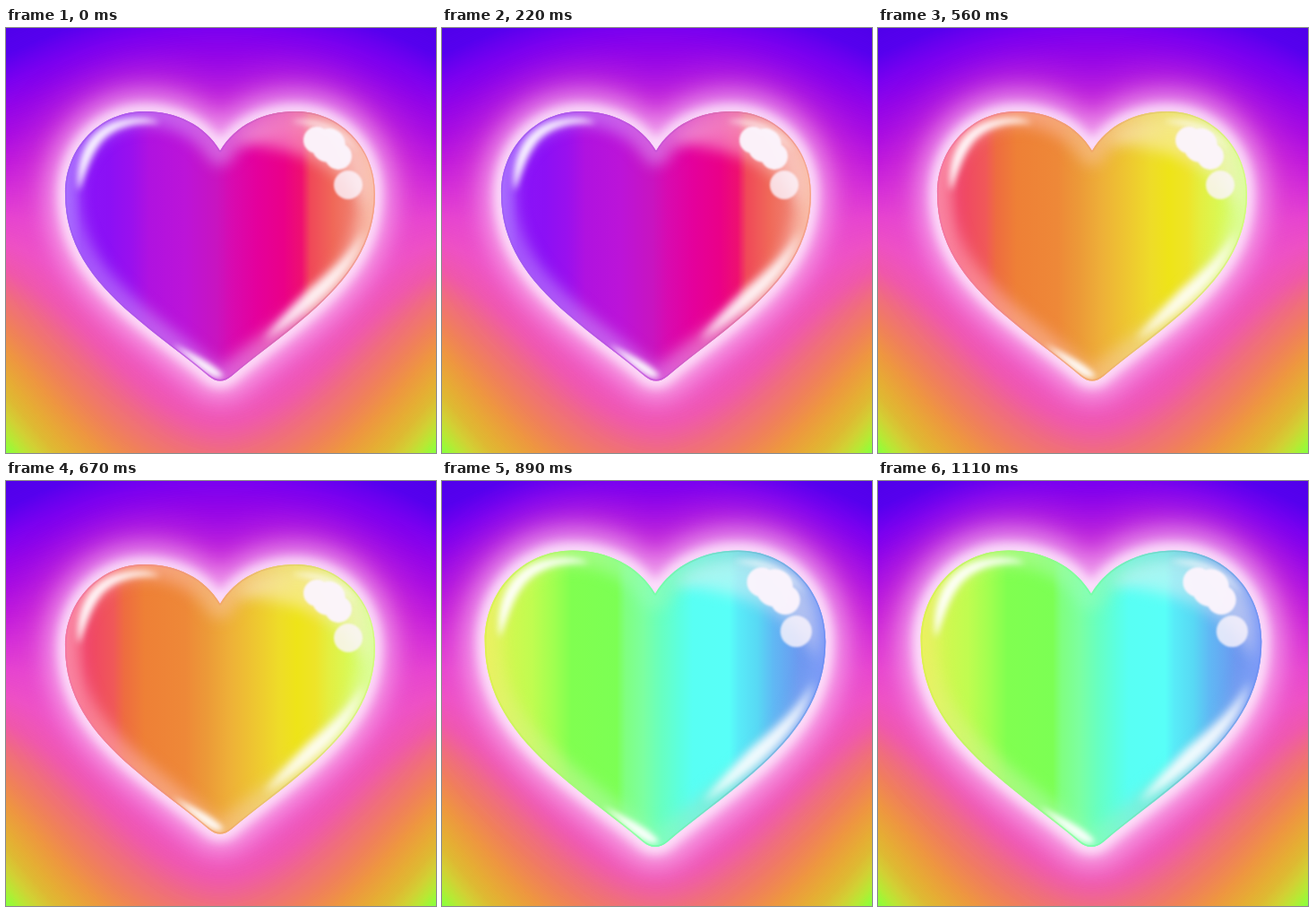
Recreate the animation shown at these times as an HTML page with a canvas. Size 480 by 474 pixels, loop 1.22 s.

```html
<!DOCTYPE html>
<html lang="en">
<head>
<meta charset="utf-8">
<title>Glossy heart</title>
<style>
html, body { margin: 0; width: 100%; height: 100%; overflow: hidden; background: #e84ccc; }
canvas { display: block; width: 480px; height: 474px; }
</style>
</head>
<body>
<canvas id="stage" width="480" height="474"></canvas>
<script>
const W = 480, H = 474, LOOP = 1220;
const ctx = document.getElementById('stage').getContext('2d');

const heart = new Path2D(
  'M239 137 C222 108 190 93 155 93 C105 93 66 133 66 185 C66 240 95 280 140 319 ' +
  'C170 345 200 366 226 388 Q239 399 252 388 C278 366 308 345 338 319 ' +
  'C383 280 412 240 412 185 C412 133 373 93 323 93 C288 93 256 108 239 137Z');
const leftGloss = new Path2D(
  'M81 182 C76 142 94 108 132 102 C150 99 164 101 172 106 C140 104 117 112 104 130 C93 145 89 162 81 182Z');
const rightGloss = new Path2D(
  'M400 225 C393 260 366 292 334 317 C320 328 305 338 288 348 C304 327 322 308 338 292 C364 270 386 252 400 225Z');
const topGloss = new Path2D('M318 104 C345 98 376 108 394 140 C378 120 350 110 318 104Z');
const lobeSheen = new Path2D(
  'M258 128 C280 100 340 94 376 114 C402 134 408 170 402 205 C388 166 345 135 258 128Z');
const tipGloss = new Path2D('M186 352 C204 362 230 372 243 388 C234 394 222 386 186 352Z');

const sky = [
  '0 #5000ea', '30 #5600ee', '60 #7a00f0', '90 #9405e8', '120 #aa0ce2', '150 #c018dc',
  '180 #d42cd8', '210 #e642d0', '240 #ee50c4', '270 #f058aa', '300 #f06e7c', '330 #f0805a',
  '360 #ee9640', '390 #e6ac34', '410 #deba32', '430 #d2d034', '450 #b8e834', '465 #98fa38', '474 #88ff40'];

const looks = [
  { start: 0, zoom: 1, rim: ['#b080ff', '#dc8cf0', '#ffd0b4'], edge: ['#9a5cf0', '#c050d8', '#f49878'], fill: [
    '66 #9a50ff', '85 #8a14f8', '115 #8c10f5', '140 #9a10ee', '160 #b012e0', '200 #bc14d8',
    '235 #c814c0', '252 #d80ab0', '280 #e4009c', '310 #ea0088', '330 #ee1070', '340 #f04858',
    '365 #f06858', '385 #f07c6c', '412 #f0a090'] },
  { start: 560, zoom: 1, rim: ['#ff9cb8', '#f8c090', '#e4ffb0'], edge: ['#f070a4', '#f0a068', '#ccfa70'], fill: [
    '66 #f05a80', '90 #f04468', '120 #f05858', '132 #ee6c40', '155 #ee8036', '200 #ee8838',
    '225 #ec9a38', '250 #eeb038', '280 #eec830', '305 #eedc28', '325 #eee418', '345 #eee428',
    '360 #e4ee40', '385 #d8fa58', '412 #c8ff70'] },
  { start: 890, zoom: 1.1, rim: ['#f0f070', '#90ffb8', '#8ca4fc'], edge: ['#d8f048', '#70ffa0', '#6c8cf4'], fill: [
    '66 #e4f044', '82 #d8f650', '114 #c0fc50', '136 #a0ff50', '154 #80ff50', '200 #7cff54',
    '209 #80ff80', '227 #7cffa0', '245 #68ffc0', '264 #5cffe0', '277 #58fff4', '314 #58fff8',
    '323 #58ecf8', '343 #58d8f4', '359 #60b8f4', '386 #6c98f0', '412 #5c80f0'] }
];

function sweep(stops, from, to) {
  const g = ctx.createLinearGradient(from, 0, to, 0);
  for (const s of stops) {
    const [x, color] = s.split(' ');
    g.addColorStop((x - from) / (to - from), color);
  }
  return g;
}

// Three colours spread evenly over the width of the heart.
function across([left, mid, right]) {
  return sweep(['66 ' + left, '239 ' + mid, '412 ' + right], 66, 412);
}

// Colour bands bow upward at the top and sag toward the middle at the bottom.
function makeBackdrop() {
  ctx.fillStyle = sweep(sky, 0, 474);
  ctx.fillRect(0, 0, W, 1);
  const ramp = ctx.getImageData(0, 0, W, 1).data;
  const img = ctx.createImageData(W, H);
  for (let y = 0; y < H; y++) {
    const k = y / H, s = k * k * (3 - 2 * k);
    for (let x = 0; x < W; x++) {
      const d = Math.min(1, Math.abs(x - 239.5) / 240);
      const lift = 60 * (1 - d * d) * (1 - s) - 175 * (1 - d ** 1.7) * s;
      const i = Math.max(0, Math.min(473, Math.round(y + lift))) * 4;
      const o = (y * W + x) * 4;
      for (let c = 0; c < 4; c++) img.data[o + c] = ramp[i + c];
    }
  }
  return img;
}

function soft(blur, alpha, draw) {
  ctx.save();
  ctx.filter = `blur(${blur}px)`;
  ctx.globalAlpha = alpha;
  draw();
  ctx.restore();
}

function outline(width, style) {
  ctx.lineJoin = 'round';
  ctx.lineWidth = width;
  ctx.strokeStyle = style;
  ctx.stroke(heart);
}

function dots(list) {
  ctx.beginPath();
  for (const [x, y, r] of list) {
    ctx.moveTo(x + r, y);
    ctx.arc(x, y, r, 0, 7);
  }
  ctx.fill();
}

function shine(path, blur, alpha) {
  soft(blur, alpha, () => ctx.fill(path));
}

function paint(look) {
  ctx.putImageData(backdrop, 0, 0);
  ctx.save();
  ctx.translate(239, 248.3);
  ctx.scale(look.zoom, look.zoom);
  ctx.translate(look.zoom > 1 ? -239.9 : -239, -248.3);

  soft(20, 0.5, () => outline(84, '#f05cd0'));
  soft(13, 0.6, () => outline(42, '#ffd8fa'));
  soft(6, 0.8, () => outline(15, '#fff4ff'));

  ctx.fillStyle = sweep(look.fill, 66, 412);
  ctx.fill(heart);
  ctx.clip(heart);
  soft(8, 0.62, () => outline(32, across(look.rim)));

  ctx.fillStyle = '#fff0f2';
  shine(lobeSheen, 8, 0.45);
  ctx.fillStyle = '#fff';
  shine(leftGloss, 3.5, 0.95);
  shine(topGloss, 3, 0.6);
  shine(rightGloss, 5, 0.9);
  shine(tipGloss, 3, 0.95);
  soft(0.7, 0.7, () => outline(3, across(look.edge)));

  ctx.fillStyle = '#fbf4fc';
  soft(1.2, 0.97, () => dots([[347, 125, 15], [360, 131, 19], [371, 143, 15]]));
  soft(1.2, 0.82, () => dots([[382, 175, 16]]));
  ctx.restore();
}

const backdrop = makeBackdrop();
const begin = performance.now();
let shown = null;

function tick() {
  const t = (performance.now() - begin) % LOOP;
  const look = looks.filter(l => l.start <= t).pop();
  if (look !== shown) paint(shown = look);
  requestAnimationFrame(tick);
}
tick();
</script>
</body>
</html>
```
